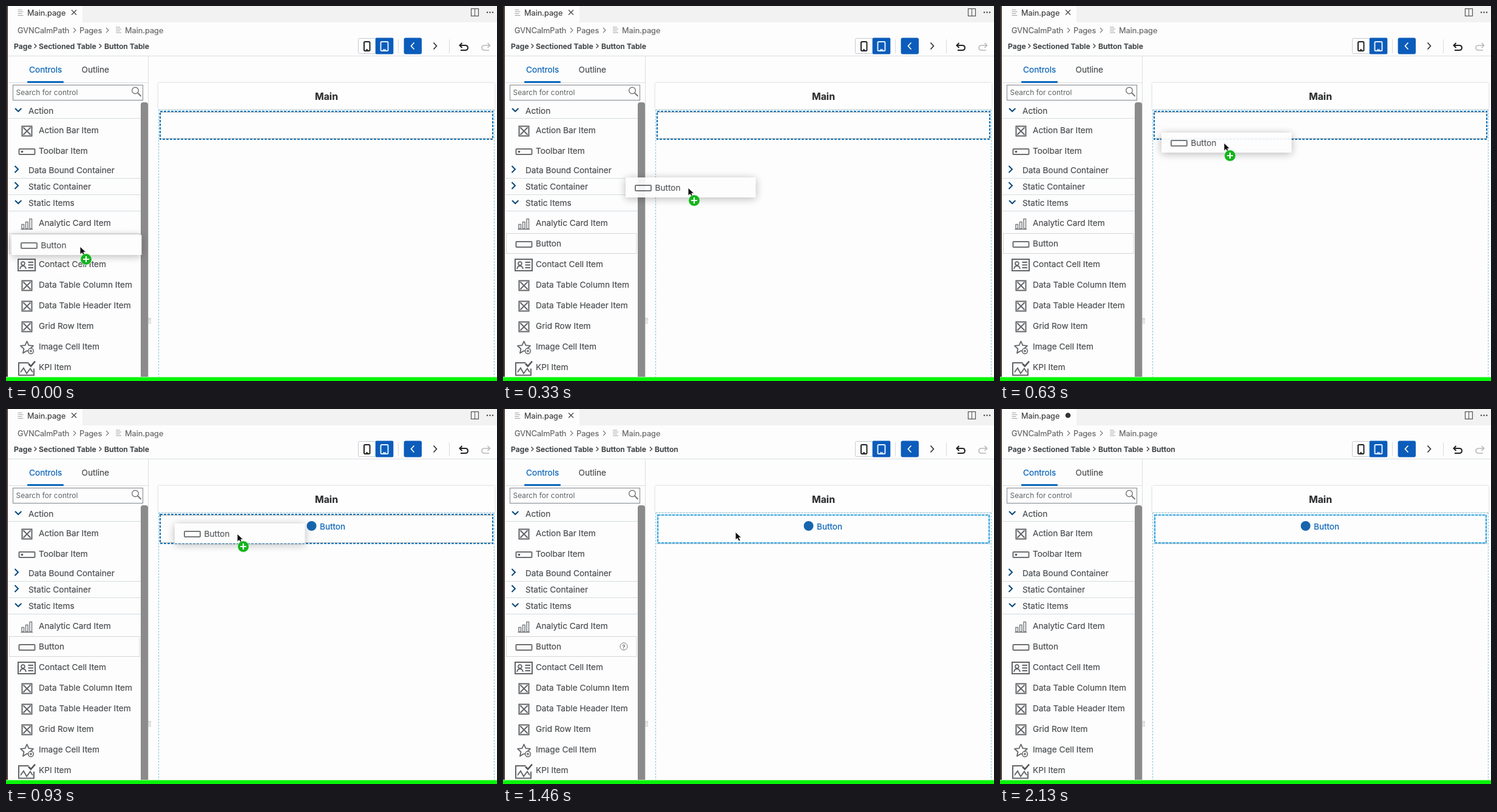
These frames come from a looping animation (809 by 619 pixels, 2960 ms). An HTML page:

```html
<!DOCTYPE html>
<html lang="en">
<head>
<meta charset="utf-8">
<title>Page editor</title>
<style>
  html, body { margin: 0; width: 100%; height: 100%; overflow: hidden; background: #fdfdfd; }
  svg { display: block; width: 100vw; height: 100vh; }
  text { font-family: Inter, "Liberation Sans", sans-serif; font-size: 13.65px; fill: #4b4e51; stroke: #4b4e51; stroke-width: .2px; white-space: pre; }
  .tab { font-size: 12.75px; fill: #666; stroke: #666; }
  .crumb { font-size: 12.2px; font-weight: 600; fill: #3f4347; }
  .link { fill: #0a64b8; stroke: #0a64b8; }
  .title { font-size: 15.8px; font-weight: 700; fill: #2b2d2f; }
  .hint { font-size: 12px; fill: #606366; stroke: none; }
  .card { filter: drop-shadow(0 2px 7px rgba(0, 0, 0, .3)); }
</style>
</head>
<body>
<svg id="stage" viewBox="0 0 809 619"></svg>
<script>
const stage = document.getElementById('stage');
const LOOP = 2960;
const BLUE = '#0b5cbb', NAVY = '#0c4a7c', GREY = '#626568';

const rect = (x, y, w, h, fill, more = '') =>
  `<rect x="${x}" y="${y}" width="${w}" height="${h}" fill="${fill}" ${more}/>`;
const path = (d, stroke, width = 1, more = '') =>
  `<path d="${d}" fill="none" stroke="${stroke}" stroke-width="${width}" ${more}/>`;
const text = (x, y, s, more = '') => `<text x="${x}" y="${y}" ${more}>${s}</text>`;
const group = (id, body, more = '') => `<g id="${id}" ${more}>${body}</g>`;
const at = (x, y, body) => `<g transform="translate(${x} ${y})">${body}</g>`;
const box = (x, y, w, h, stroke, width = 1, more = '') =>
  rect(x, y, w, h, 'none', `stroke="${stroke}" stroke-width="${width}" ${more}`);
const hline = (x1, x2, y, color) => path(`M${x1} ${y}H${x2}`, color);
const vline = (x, y1, y2, color) => path(`M${x} ${y1}V${y2}`, color);

// Icons are drawn around their own centre.
const pill = box(-13, -4.5, 26, 9, '#6c6f71', 2, 'rx="1"');
const icons = {
  cross: box(-8, -8, 16, 16, GREY, 2) + path('M-6-6L6 6M6-6L-6 6', GREY, 1.9),
  toolbar: pill + '<circle cx="-8" r="1.8" fill="#55585a"/>',
  chart: path('M-8.5 8V1H-5V8ZM-2 8V-3H1.5V8ZM4.5 8V-8H8V8ZM-10 9H9.5', '#7c7f81', 1.5),
  pill,
  contact: box(-14.5, -9.5, 28, 19, GREY, 2) +
    '<circle cx="-6.5" cy="-2.5" r="2.9" fill="none" stroke="#626568" stroke-width="1.8"/>' +
    path('M-11.5 6.5Q-10.5 1.5-6.5 1.5T-1.5 6.5', GREY, 1.8) +
    path('M2-4.5H10.5M2 0H10.5M2 4.5H10.5', GREY, 1.9),
  star: path('M0-10L3-3.4 10.5-2.6 5 2.5 6 8 0 5.5-6.5 9.5-5 2.5-10.5-2.6-3-3.4Z', GREY, 1.8, 'stroke-linejoin="round"') +
    '<circle cx="6.5" cy="6" r="4.4" fill="#fdfdfd" stroke="#626568" stroke-width="1.5"/>' +
    path('M4.3 6H8.7M6.5 3.8V8.2', GREY, 1.3),
  kpi: path('M3-8.5H-13.5V12H11.5V1', GREY, 2) +
    path('M-10.5 7L-5.5 0-.5 9 5.5 1 9.5 7', GREY, 1.9) + path('M2.5-7L6.5-3 13.5-11', '#505356', 2.6)
};

const sections = [['Action', 173, 1], ['Data Bound Container', 271, 0], ['Static Container', 298, 0], ['Static Items', 325, 1]];
const items = [
  ['Action Bar Item', 205, 'cross'], ['Toolbar Item', 239, 'toolbar'],
  ['Analytic Card Item', 358, 'chart'], ['Button', 392, 'pill'],
  ['Contact Cell Item', 426, 'contact'], ['Data Table Column Item', 460, 'cross'],
  ['Data Table Header Item', 494, 'cross'], ['Grid Row Item', 528, 'cross'],
  ['Image Cell Item', 562, 'star'], ['KPI Item', 596, 'kpi']
];

function tabBar() {
  const lines = (x, y) => path(`M${x} ${y - 4}h7M${x} ${y - 1}h9M${x} ${y + 2}h7M${x} ${y + 5}h9`, '#a0a0a0');
  const chevron = (x, y) => path(`M${x} ${y - 4}l4 4-4 4`, '#777', 1.1);
  const crumb = (x, s) => text(x, 44.5, s, 'class="tab"');
  return rect(0, 0, 809, 27, '#f2f2f3') + rect(3, 0, 123, 28, '#fdfdfd') +
    lines(19.5, 10.5) + text(35, 15.5, 'Main.page', 'class="tab" style="fill:#333"') +
    group('close', path('M108 6.5l8 8M116 6.5l-8 8', '#444', 1.2)) +
    '<circle id="dirty" cx="112" cy="10.5" r="4.3" fill="#333"/>' +
    box(766.5, 4.5, 12, 12, '#555', 1.2) + vline(772.5, 4.5, 16.5, '#555') +
    [793, 797.5, 802].map(x => `<circle cx="${x}" cy="10.5" r="1.2" fill="#444"/>`).join('') +
    crumb(19, 'GVNCalmPath') + chevron(111, 40) + crumb(121, 'Pages') + chevron(165, 40) +
    lines(181, 39) + crumb(196, 'Main.page');
}

function toolBar() {
  const chevron = x => path(`M${x} 62.5l3.5 3.5-3.5 3.5`, '#444', 1.4);
  const crumb = (x, s) => text(x, 70.5, s, 'class="crumb"');
  const turn = 'M-6-3H2.5Q7-3 7 1T2.5 5H-5M-2.5-7L-6.5-3-2.5 1';
  return crumb(13, 'Page') + chevron(46.5) + crumb(54, 'Sectioned Table') + chevron(153.5) + crumb(162, 'Button Table') +
    group('leaf', chevron(242) + crumb(250, 'Button')) +
    box(580.5, 53.5, 57, 25, '#c5cbd1', 1, 'rx="2"') + rect(608.7, 52.5, 29.6, 27, BLUE, 'rx="2"') +
    box(590, 59, 9.5, 15, '#222', 2, 'rx="1.5"') + path('M593 72h3.5', '#222', 1.5) +
    box(617.5, 59, 12, 15, '#e4f0fb', 2, 'rx="1.5"') + path('M621 72h5', '#e4f0fb', 1.5) +
    vline(646.5, 55, 78, '#d9d9d9') + rect(655.6, 52.5, 29.4, 27, BLUE, 'rx="3"') +
    path('M672.5 60.5l-5 5.5 5 5.5', '#fff', 1.7) + path('M704.5 60.5l5 5.5-5 5.5', '#333', 1.7) +
    vline(730.5, 55, 78, '#d9d9d9') + at(754, 68, path(turn, '#222', 2)) +
    `<g transform="translate(791 68) scale(-1 1)">${path(turn, '#b8b8b8', 1.6)}</g>` +
    hline(3, 809, 82.5, '#dcdee0');
}

function sidePanel() {
  const heads = sections.map(([name, y, open]) =>
    path(open ? `M15 ${y - 4}l5.2 5 5.2-5` : `M14.5 ${y - 7}l5.5 5.5-5.5 5.5`, NAVY, 2.1) +
    text(37, y + 5, name) + hline(4, 222, y + 13.5 - (open && y < 200 ? 1 : 0), '#d5dce2')).join('');
  const rows = items.map(([name, y, icon]) =>
    `<g ${name === 'Button' ? 'id="row"' : ''}>` + at(34.5, y + 1.5, icons[icon]) + text(54, y + 5, name) + '</g>').join('');
  return text(38, 110, 'Controls', 'class="link"') + text(124.5, 110, 'Outline') +
    hline(4, 234, 126.5, '#dcdee0') + rect(35, 124, 60, 3, '#0a67bd', 'rx="1"') +
    box(11.5, 130.5, 214, 25, '#80868b') + text(16.5, 147, 'Search for control', 'class="hint"') +
    '<circle cx="213" cy="139.5" r="5.3" fill="none" stroke="#777" stroke-width="1.4"/>' + path('M217 143.5l5.5 5.5', '#777', 1.9) +
    heads + group('outline', box(5.5, 375.5, 214.5, 33, '#d6d6d6')) + rows +
    group('help', '<circle cx="199" cy="392" r="6" fill="none" stroke="#777"/>' +
      text(199, 395.5, '?', 'text-anchor="middle" style="font-size:9.5px"')) +
    rect(222, 159, 12, 470, '#8b8b8b', 'rx="4"') + vline(234.5, 83, 614, '#dcdee0') +
    path('M235.5 515v9M238 515v9', '#a5a5a5', 1.3, 'stroke-dasharray="1.4 1.2"');
}

function canvas() {
  const thin = d => path(d, '#93cbe4', 1.2, 'stroke-dasharray="3 2"');
  return rect(251, 127, 554, 43, '#fefefe', 'style="filter:drop-shadow(0 0 1.5px rgba(0,0,0,.22))"') +
    text(528, 155, 'Main', 'class="title" text-anchor="middle"') +
    thin('M251.5 171V614M804.5 171V614M251.5 171.5H805') +
    '<path id="edge" fill="none" stroke="#b9bdc0"/>' +
    '<rect id="glow" fill="none" stroke="#bfe2f2" stroke-width="2.6"/>' +
    '<rect id="dash" fill="none" stroke-width="2.2" stroke-dasharray="4 2"/>' +
    group('placed', '<circle cx="503.5" cy="193" r="8" fill="#1765ad"/>' + text(517, 198.5, 'Button', 'class="link"'));
}

stage.innerHTML = rect(0, 0, 809, 619, '#fdfdfd') + tabBar() + toolBar() + sidePanel() + canvas() +
  rect(0, 0, 3, 614, '#40302e') + rect(0, 612, 809, 1, '#a8f5a8') + rect(0, 613, 809, 6, '#06f506') +
  group('ghost', rect(0, 0, 214.5, 33, '#fefefe', 'class="card"') + at(29, 17.5, pill) + text(48.5, 21.5, 'Button'), 'opacity=".92"') +
  group('cursor',
    '<path d="M0 0V13.2L3.2 10.4 5.6 15.2 8.2 14 5.8 9.3H9.8Z" fill="#111" stroke="#fff" stroke-width=".9"/>' +
    group('plus', '<circle cx="10" cy="21" r="9.3" fill="#12b51b" stroke="#e6f5e6" stroke-width=".8"/>' +
      path('M5 21H15M10 16V26', '#fff', 2.2)));

const $ = Object.fromEntries([...stage.querySelectorAll('[id]')].map(el => [el.id, el]));
const show = (el, on) => el.setAttribute('display', on ? 'inline' : 'none');
const set = (el, attrs) => Object.entries(attrs).forEach(([k, v]) => el.setAttribute(k, v));

const ticks = [0, 30, 100, 130, 230, 260, 330, 360, 460, 560, 630, 730, 760, 830, 930, 960, 1030,
  1130, 1460, 1660, 1860, 1930, 1960, 2030, 2130];
const trail = [[0, 122, 397], [100, 176, 386], [230, 252, 350], [330, 305, 300], [460, 352, 248], [630, 369, 226],
  [930, 381, 206], [1030, 383, 203], [1660, 383, 203], [1860, 388, 245], [2030, 420, 470], [2130, 440, 640]];

function position(t) {
  const i = trail.findIndex(p => p[0] > t);
  if (i < 0) return trail[trail.length - 1].slice(1);
  const [a, b] = [trail[i - 1], trail[i]];
  const k = (t - a[0]) / (b[0] - a[0]);
  return [a[1] + (b[1] - a[1]) * k, a[2] + (b[2] - a[2]) * k];
}

function draw(time) {
  const t = ticks.filter(v => v <= time).pop();
  const [x, y] = position(t);
  const dragging = t < 1130, added = t >= 830, selected = t >= 1460, saved = t < 1860;
  const lag = Math.max(0, 1 - t / 100);

  set($.cursor, { transform: `translate(${x} ${y})` });
  set($.ghost, { transform: `translate(${x - 103 - 10 * lag} ${y - 17 - 2 * lag})` });
  show($.cursor, t < 2130);
  show($.ghost, dragging);
  show($.plus, dragging);
  show($.row, t >= 30);
  show($.outline, t < 1660);
  show($.help, selected && t < 1660);
  show($.leaf, selected);
  show($.placed, added);
  show($.close, saved);
  show($.dirty, !saved);
  show($.glow, selected);

  const inset = selected ? 1 : 0;
  const frame = {
    x: 254 + inset, y: 174 + inset, width: 548 - 2 * inset,
    height: (added ? 48 : 46) - 2 * inset
  };
  set($.glow, frame);
  set($.dash, { ...frame, stroke: selected ? '#3ba6dd' : '#1c78b8' });
  set($.edge, { d: selected ? 'M253 222.5H803' : `M254 175.5H802M254 ${added ? 220.5 : 218.5}H802` });
}

const start = performance.now();
function loop() {
  draw((performance.now() - start) % LOOP);
  requestAnimationFrame(loop);
}
loop();
</script>
</body>
</html>
```
